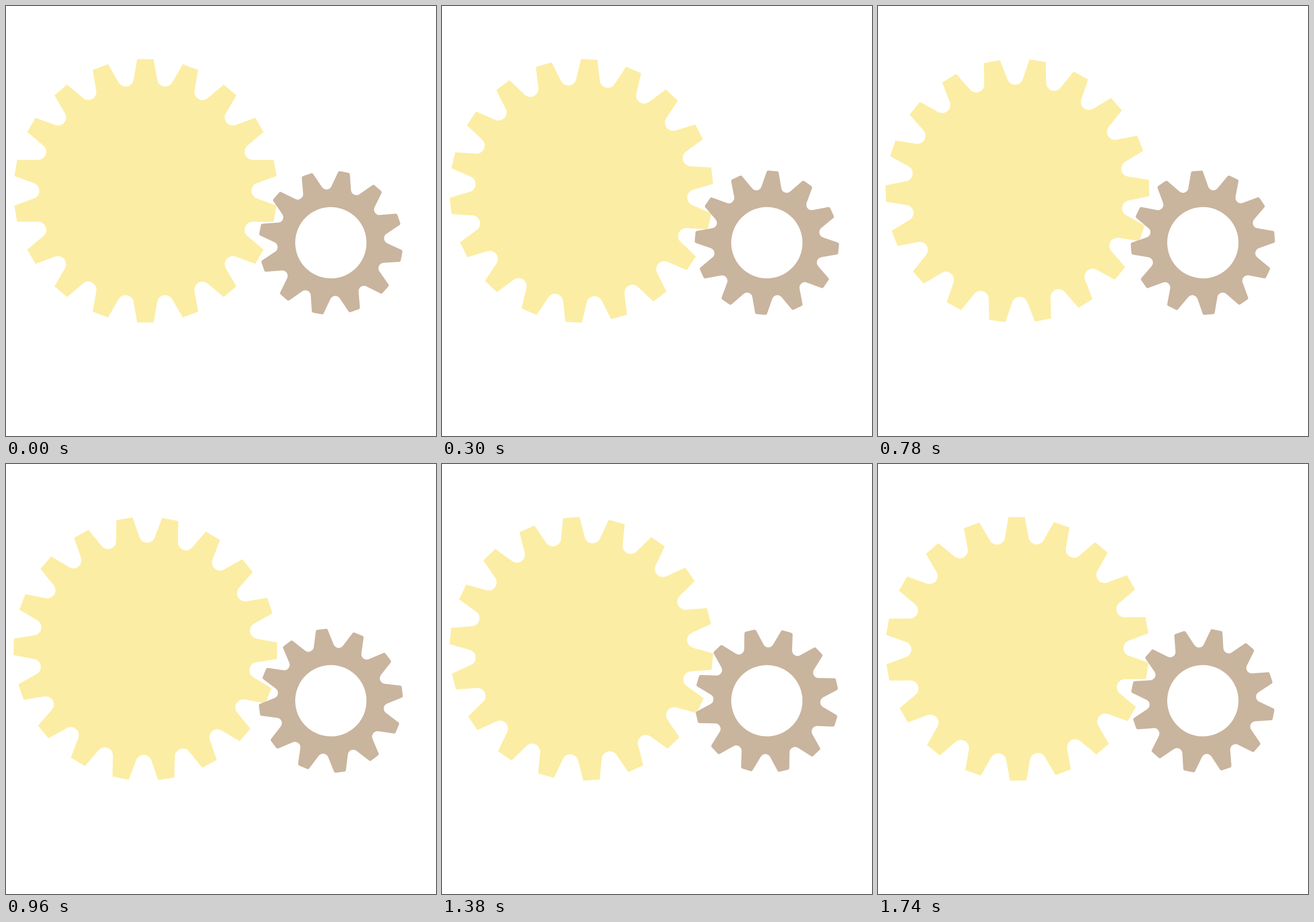
Recreate the animation shown at these times as an HTML page with a canvas. Size 748 by 748 pixels, loop 1770 ms.

```html
<!DOCTYPE html>
<html lang="en">
<head>
<meta charset="utf-8">
<title>Gears</title>
<style>
html, body { margin: 0; height: 100%; overflow: hidden; background: #fff; }
canvas { display: block; }
</style>
</head>
<body>
<canvas id="stage" width="748" height="748"></canvas>
<script>
const ctx = document.getElementById('stage').getContext('2d');
const { PI, sin, cos } = Math;
const RAD = PI / 180;
const STEP = 30, FRAMES = 59;

// tip: half width of a tooth's end, flank: slope of its sides in degrees,
// root: radius at the bottom of the gaps, round: corner radius
const big = { x: 242.5, y: 321.5, teeth: 18, radius: 229.5, tip: 14.3, flank: 10,
  root: 184.5, round: 0, hole: 0, color: '#fceda4' };
const small = { x: 565.1, y: 411.8, teeth: 12, radius: 125.6, tip: 9.9, flank: 14.5,
  root: 92.8, round: 3, hole: 62, color: '#c9b49e' };

function drawGear(g, degrees) {
  const half = PI / g.teeth;
  const flank = g.flank * RAD;
  const tipAngle = Math.asin(g.tip / g.radius);
  const x = g.radius * cos(tipAngle), y = g.tip;

  // Circle touching both sides of a gap and its bottom
  const slope = flank + half;
  const u = g.radius * cos(half - tipAngle), v = g.radius * sin(half - tipAngle);
  const gap = (v * cos(slope) - (u - g.root) * sin(slope)) / (1 - sin(slope));

  ctx.save();
  ctx.translate(g.x, g.y);
  ctx.rotate(degrees * RAD - PI / 2 - half);
  ctx.beginPath();
  for (let i = 0; i < g.teeth; i++) {
    ctx.arc(g.root + gap, 0, gap, 1.5 * PI - slope, PI / 2 + slope, true);
    ctx.rotate(half);
    ctx.arcTo(x, -y, g.radius, 0, g.round);
    ctx.arcTo(x, y, x - cos(flank), y + sin(flank), g.round);
    ctx.rotate(half);
  }
  ctx.closePath();
  if (g.hole) {
    ctx.moveTo(g.hole, 0);
    ctx.arc(0, 0, g.hole, 0, 2 * PI, true);
  }
  ctx.fillStyle = g.color;
  ctx.fill();
  ctx.restore();
}

// The small gear turns half a tooth in 25 steps and the other half in the rest
function smallTurn(n) {
  return n < 25 ? n * 15 / 25 : 15 + (n - 25) * 15 / (FRAMES - 25);
}

const start = performance.now();

function draw() {
  const n = Math.floor(Math.max(0, performance.now() - start) / STEP) % FRAMES;
  ctx.clearRect(0, 0, 748, 748);
  drawGear(big, n * 20 / FRAMES);
  drawGear(small, 10.7 - smallTurn(n));
  requestAnimationFrame(draw);
}
draw();
</script>
</body>
</html>
```
